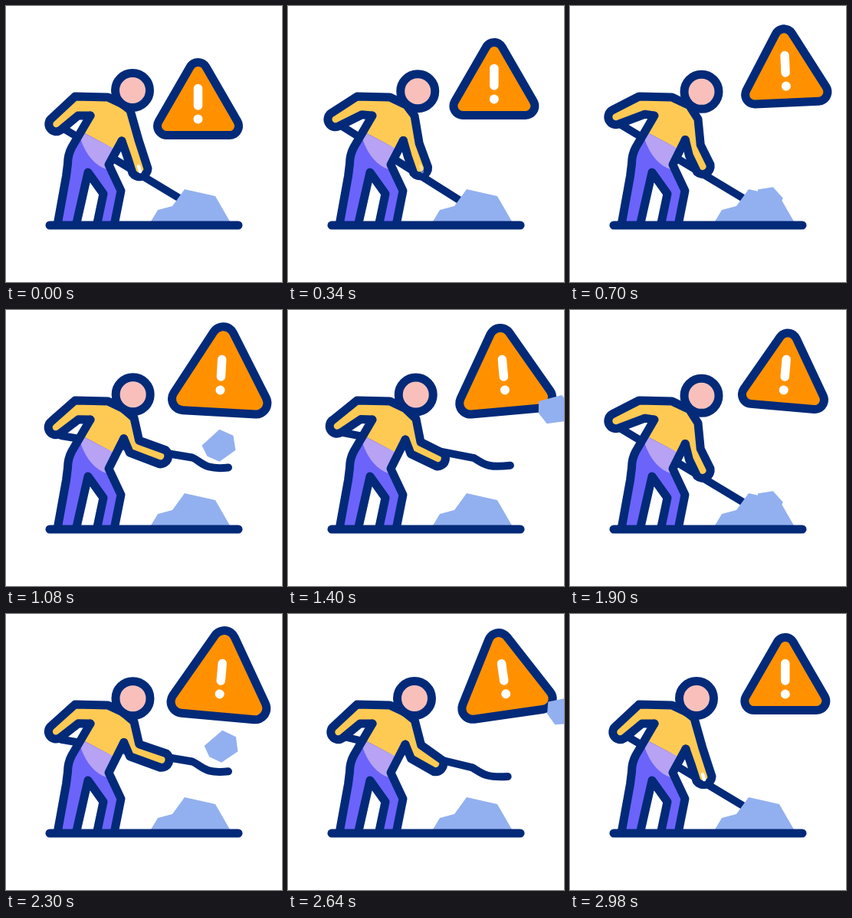
An HTML page for the animation above (3 s loop, 360x360 px).

```html
<!DOCTYPE html>
<html lang="en">
<head>
<meta charset="utf-8">
<title>Roadworks</title>
<style>
  :root {
    --navy: #022a78;
    --yellow: #ffca54;
    --stone: #92b0f0;
    --sine: cubic-bezier(.364, 0, .636, 1);
  }
  html, body { margin: 0; width: 100%; height: 100%; overflow: hidden; background: #fff; }
  svg { display: block; width: 100vw; height: 100vh; }
  g, path, circle { animation: 3s var(--sine) infinite; }

  .line { fill: none; stroke: var(--navy); stroke-width: 11; stroke-linecap: round; stroke-linejoin: round; }
  .stone { fill: var(--stone); }

  /* Worker: rest, dig, throw, dig, throw, rest */
  .upper { fill: var(--yellow); animation-name: upper; }
  .side { animation-name: side; }
  .head { fill: #f9c0bb; animation-name: head; }
  .glint { stroke: #fff; stroke-width: 4.5; animation-name: glint; }
  .shovel { stroke-width: 10; animation-name: shovel; }

  @keyframes upper {
    0%, 100% { d: path("M110 143 L94 143 L71 162 A9.6 9.6 0 0 1 60 146 L90 118 L133 119 L152 128 L162 136 L173 175 L185 212 A11 11 0 0 1 165 218 L158 196 L151 176"); }
    20%, 60% { d: path("M109 143 L98 141 L64 153 A9.6 9.6 0 0 1 55 135 L90 118 L133 119 L156 130 L167 148 L170 182 L181 209 A10.5 10.5 0 0 1 163 218 L155 196 L150 175"); }
    40%, 80% { d: path("M110 143 L94 143 L71 162 A9.6 9.6 0 0 1 60 146 L90 118 L133 119 L152 128 L167 140 L174 169 L211 180 A10.3 10.3 0 0 1 204 199 L162 185 L154 167"); }
  }
  @keyframes side {
    0%, 100% { d: path("M151 176 L134 207 L150 241 L142 281"); }
    20%, 60% { d: path("M150 175 L134 207 L150 241 L142 281"); }
    40%, 80% { d: path("M154 167 L134 207 L150 241 L142 281"); }
  }
  @keyframes head {
    0%, 40%, 80%, 100% { translate: 165px 110px; }
    20%, 60% { translate: 172px 112px; }
  }
  @keyframes glint {
    0%, 100% { opacity: 1; }
    20%, 80% { opacity: 0; }
  }
  @keyframes shovel {
    0%, 100% { d: path("M72 158 L225 250 C234 255 241 267 264 276"); }
    20%, 60% {
      d: path("M66 154 L222 255 C232 261 239 270 262 278");
      animation-timing-function: cubic-bezier(.33, 0, .67, .73);
    }
    36%, 76% {
      d: path("M72 164 L243 192.5 C256 198 258 209 290 205.5");
      animation-timing-function: linear;
    }
    46.667%, 86.667% {
      d: path("M72 160 L243 193 C256 201 260 206 290 202.5");
      animation-timing-function: cubic-bezier(.33, .4, .67, 1);
    }
  }

  /* Thrown stone: separate easing for each axis */
  .throw-x { animation-name: throw-x; }
  .throw-y { animation-name: throw-y; }
  .spin { animation-name: spin; animation-timing-function: linear; }
  @keyframes throw-x {
    0%, 100% { translate: 400px; animation-timing-function: step-end; }
    20%, 60% { translate: 256px; animation-timing-function: cubic-bezier(.333, 0, .667, -.09); }
    36%, 76% { translate: 277.3px; animation-timing-function: cubic-bezier(.333, .212, .667, .54); }
    50.667%, 90.667% { translate: 383px; animation-timing-function: step-end; }
  }
  @keyframes throw-y {
    0%, 20%, 60%, 100% { translate: 0 264px; animation-timing-function: cubic-bezier(.333, 0, .667, .632); }
    36%, 76% { translate: 0 177px; animation-timing-function: cubic-bezier(.333, .543, .667, .877); }
    50.667%, 90.667% { translate: 0 121px; animation-timing-function: step-end; }
  }
  @keyframes spin {
    0%, 20%, 60%, 100% { rotate: -42deg; }
    50.667%, 90.667% { rotate: 38deg; }
  }

  /* Warning sign: the triangle pulses, its border and mark keep their size */
  .rise { animation-name: rise; }
  .sway { animation-name: sway; }
  .pulse { animation-name: pulse; }
  .sign { stroke-linejoin: round; }
  .face { animation-name: face; }
  @keyframes rise {
    0% { translate: 250.5px 123.5px; }
    20%, 100% { translate: 280.8px 80.5px; }
  }
  @keyframes sway {
    0%, 20%, 100% { rotate: 0deg; }
    30%, 50%, 70%, 90% { rotate: -10deg; }
    40%, 60%, 80% { rotate: 10deg; }
  }
  @keyframes pulse {
    0%, 20%, 60%, 100% { scale: 1; }
    40%, 80% { scale: 1.175; }
  }
  @keyframes face {
    0%, 20%, 60%, 100% { stroke-width: 13px; }
    40%, 80% { stroke-width: 16.3px; }
  }
</style>
</head>
<body>
<svg viewBox="0 0 360 360">
  <path class="line shovel"/>

  <polygon fill="#6c63fb" points="100,160 86,184 80,204 67,281 92,281 107,217 127,245 119,281 142,281 150,241 134,207 143,188"/>
  <path fill="#b7a2f3" d="M102 166 L141 186 L131 213 Q108 205 97 173 Z"/>
  <polygon fill="#ffca54" points="110,143 101,165 141,186 148,176 151,130"/>
  <path class="line upper"/>
  <path class="line" d="M110 143 L86 184 Q80.5 194 80.5 206 L78.5 222 L67.5 283 M92 283 L107 217 L127 245 L119 283"/>
  <path class="line side"/>
  <path class="line glint" d="M173 209 L175 216"/>
  <circle class="line head" r="22.5"/>

  <polygon class="stone" points="189,281 198,266 217,261 233,239 273,248 292,281"/>
  <path class="line" d="M57 286 H303"/>

  <g class="rise"><g class="sway">
    <g class="pulse">
      <path class="sign" d="M0 -38 L41 33 H-41 Z" fill="#022a78" stroke="#022a78" stroke-width="35"/>
      <path class="sign face" d="M0 -38 L41 33 H-41 Z" fill="#ff9100" stroke="#ff9100"/>
    </g>
    <path d="M0 -16 V6.5" stroke="#fff" stroke-width="11.5" stroke-linecap="round"/>
    <circle cy="24" r="6" fill="#fff"/>
  </g></g>

  <g class="throw-x"><g class="throw-y">
    <path class="stone spin" d="M1 -21 L19 -13 L22 6 L1 21 L-15 14 L-22 0 Z"/>
  </g></g>
</svg>
</body>
</html>
```
